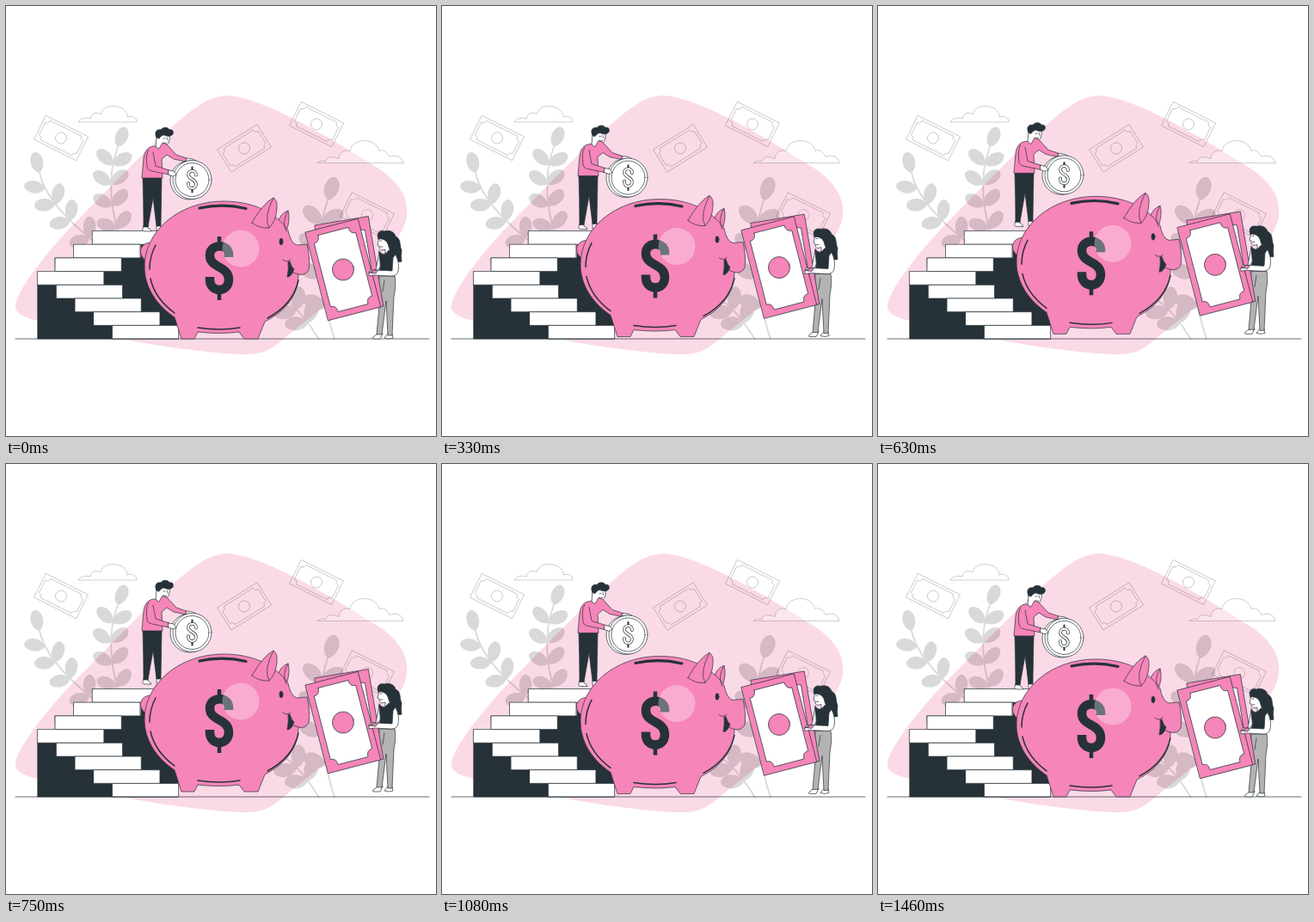
Recreate the animation shown at these times as an HTML page. Size 500 by 500 pixels, loop 1500 ms.

```html
<!DOCTYPE html>
<html lang="en">
<head>
<meta charset="utf-8">
<title>Savings</title>
<style>
html, body { margin: 0; width: 100%; height: 100%; overflow: hidden; background: #fff; }
svg { display: block; width: 100vw; height: 100vh; }
.line { fill: none; stroke: #263238; stroke-width: .7; stroke-linecap: round; stroke-linejoin: round; }
.pink { fill: #f685b9; }
.white { fill: #fff; }
.dark { fill: #263238; }
.grey { fill: #b3b3b3; }
.bold { stroke-width: 1.5; }
.faint { fill: none; stroke: #000; stroke-opacity: .24; stroke-width: .8; }
</style>
</head>
<body>
<svg viewBox="0 0 500 500">
  <defs>
    <path id="leaf" d="M0 0C-9-5-9-16-5-22Q-2-26 2-24C9-20 9-6 0 0"/>
    <g id="note" class="faint">
      <path d="M-27.500-15.500h55v31h-55z"/>
      <path d="M-20-12.500h40q0 4 4.500 4.500v16q-4.500 .5-4.500 4.500h-40q0-4-4.500-4.500v-16q4.500-.5 4.500-4.500z"/>
      <circle r="6.500"/>
    </g>
    <g id="bill" class="line">
      <path class="pink" d="M-31.500-53h63v106h-63z"/>
      <path class="white" d="M-18-46h36q0 8 7 8v76q-7 0-7 8h-36q0-8-7-8v-76q7 0 7-8z"/>
      <circle class="pink" r="12.500"/>
    </g>
    <path id="dollar" d="M11-13v-3C11-29-11-29-11-15C-11 0 11-3 11 13C11 29-11 29-11 13v-3"/>
  </defs>

  <path fill="#fbdae7" d="M258 104C300 107 375 152 430 187C455 202 469 222 466 245C460 282 400 326 334 378C306 401 302 406 270 405C220 402 165 394 110 382L37 366Q8 360 11 347C15 329 43 288 100 232C150 181 200 130 227 114Q242 104 258 104"/>
  <g id="plants" opacity=".15"></g>
  <g class="faint">
    <path class="white" d="M84 135h68c0-6-6-8-11-6c1-14-28-18-31-3c-5-4-11-1-12 5c-5-2-12 0-14 4z"/>
    <path class="white" fill-opacity=".3" d="M362 182.500h100c-1-8-10-10-16-7c-3-7-8-9-12-7c-4-17-32-15-34 0c-9-2-12 3-13 9c-6-2-13-4-15 3c-4-1-8 0-10 2z"/>
  </g>
  <use href="#note" transform="translate(64 153.500)rotate(26.500)"/>
  <use href="#note" transform="translate(277 165.500)rotate(-32)"/>
  <use href="#note" transform="translate(361 137.500)rotate(26.500)"/>
  <use href="#note" transform="translate(420 243)rotate(26.500)"/>

  <g id="steps" class="line">
    <path class="dark" d="M37 324h22l-2-31h100v-16h43v110H37z"/>
  </g>
  <path class="line" d="M11 387H492"/>

  <g id="float" class="line">
    <!-- man -->
    <path class="white" d="M160 255l-1 4q-1 3 3 3h7q-1-3-4-4v-3zM175 255v6q5 2 7 0l-2-6z"/>
    <path class="dark" d="M159 199h22l-1 57h-5l-4-33l-6 34h-5q0-31-1-58z"/>
    <path class="white" d="M175 151l-1 13q6 6 9 0l1-2c5 1 7-6 6-12l-6-3z"/>
    <path class="dark" d="M175 153c-3-6 0-10 5-9c3-4 9-3 10 0c4-1 5 2 4 5c-2 3-7 3-10 1c-3 0-4 2-6 4z"/>
    <path d="M183 154h2M187 153l1 3M183 159q2 1 4 0"/>
    <path class="pink" d="M173 163C165 163 161 169 160 177L158 200h24l-1-22l6-5l8 5l14 3l1-4l-12-4l-11-12l-5-2l-4 7z"/>
    <path class="white" d="M210 177l7 1l4 2q-4 2-12 1z"/>
    <!-- coin -->
    <circle class="white" cx="213.500" cy="202.500" r="22.500"/>
    <circle class="white" cx="216.500" cy="202" r="22.500"/>
    <circle cx="216.500" cy="202" r="19.500"/>
    <g transform="translate(216.500 202)scale(.4)">
      <path stroke-width="5" d="M0-36v11M0 25v11"/>
      <use href="#dollar" stroke-width="9"/>
      <use href="#dollar" stroke="#fff" stroke-width="5.500"/>
    </g>
    <path class="pink" d="M166 167Q162 172 164 186Q164 191 170 192L189 196l1-5l-16-5l-3-16"/>
    <path class="white" d="M189 191l6 1l3 4l-4 2l-5-2z"/>

    <!-- woman and bills -->
    <path class="white" d="M432 381l-5 4q-2 2 1 2h7l3-6zM444 381l-4 5q5 2 10 0l-1-5z"/>
    <path class="grey" d="M434 314h18q2 9-1 24l-2 45h-5l-2-40l-5 39h-6l4-45q-3-12-1-23z"/>
    <path d="M440 319l-2 13"/>
    <path class="white" d="M434 269l-2 9l2 1q0 5 3 5l4-1v6h8l-4-19z"/>
    <path d="M435 273h2M435 280h3"/>
    <path class="dark" d="M433 271C430 264 435 260 440 262C446 260 452 263 453 268C460 271 457 278 460 284Q459 291 460 297Q455 299 452 293C446 290 447 284 445 280C444 274 440 270 433 271z"/>
    <path class="dark" d="M434 285q5 8 11-1l8 5l1 17l-4 2h-16q3-8 0-13z"/>
    <use href="#bill" transform="translate(399 302)rotate(-9.500)"/>
    <use href="#bill" transform="translate(392 306.500)rotate(-14.500)"/>
    <path class="white" d="M453 289q5 10 3 19q-1 6-8 6l-20-1-6 1v-4l7-3l20 1l1-15zM434 287l-4 20l-6 0l-2 3l8 1l5-8z"/>

    <!-- pig -->
    <path class="pink" d="M167 275c-9 1-13 9-9 16q2 4 7 6"/>
    <path class="pink" d="M316 252Q319 241 328 238Q331 248 326 262z"/>
    <path class="pink" d="M161 303C161 261 202 227 253 227C286 227 313 239 328 261Q331 276 338 278L350 277Q354 295 352 307Q348 314 340 312C340 336 325 355 301 367L293 387H277L271 379Q249 382 223 379L219 387H204L196 362C174 347 161 326 161 303z"/>
    <path class="pink" d="M286 252Q299 229 311 223Q316 226 315 236Q314 250 306 258Q295 259 286 252z"/>
    <path d="M306 258Q299 246 311 223M326 262Q320 251 328 238M340 312L334 310"/>
    <path class="bold" d="M174 278Q167 291 167 306M168 317Q173 340 196 357M340 319Q334 347 304 363M223 374Q249 378 272 374"/>
    <path stroke-width="3.200" d="M225 235Q252 229 279 235.500"/>
    <ellipse class="dark" cx="320" cy="274" rx="2" ry="3.800"/>
    <path class="dark" d="M328 298Q329 305 327 315Q332 315 335 306Q332 304 330 297z"/>
    <path d="M322 295Q326 299 331 295"/>
    <g transform="translate(248 305)" stroke-linecap="butt">
      <use href="#dollar" stroke-width="10.500"/>
      <path stroke-width="4.500" d="M0-37v13M0 24v13"/>
    </g>
    <circle cx="273" cy="282" r="21.500" fill="#fff" fill-opacity=".32" stroke="none"/>
  </g>
</svg>
<script>
const $ = id => document.getElementById(id);

function add(parent, tag, attrs) {
  const el = document.createElementNS('http://www.w3.org/2000/svg', tag);
  for (const key in attrs) el.setAttribute(key, attrs[key]);
  $(parent).append(el);
}

// A curved stem from tip to base: one leaf on the tip, pairs along the way
function plant([x0, y0], [x1, y1], [x2, y2], nodes, size = 1, firstRight = 1) {
  add('plants', 'path', { d: `M${x0} ${y0}Q${x1} ${y1} ${x2} ${y2}`, fill: 'none', stroke: '#000', 'stroke-width': 1.8 });
  for (let i = 0; i < nodes; i++) {
    const t = i / nodes, u = 1 - t;
    const x = u * u * x0 + 2 * u * t * x1 + t * t * x2;
    const y = u * u * y0 + 2 * u * t * y1 + t * t * y2;
    const dx = u * (x1 - x0) + t * (x2 - x1);
    const dy = u * (y1 - y0) + t * (y2 - y1);
    const angle = Math.atan2(-dx, dy) * 180 / Math.PI;
    const leaf = turn => add('plants', 'use', {
      href: '#leaf', transform: `translate(${x} ${y})rotate(${angle + turn})scale(${size})`
    });
    if (i === 0) leaf(0);
    else {
      leaf(-55);
      if (i >= firstRight) leaf(52);
    }
  }
}
plant([39, 194], [49, 238], [125, 290], 5, 1, 2);
plant([130, 164], [111, 213], [138, 288], 5);
plant([374, 226], [352, 290], [382, 388], 5, 1.15);
plant([325, 342], [345, 356], [364, 388], 3, 1.1);

const stepHeight = 15.7;
for (let i = 0; i < 8; i++)
  add('steps', 'rect', {
    class: 'white', x: 36.2 + 21.7 * Math.abs(i - 2.97), y: 261.5 + i * stepHeight, width: 77, height: stepHeight
  });

function draw(now) {
  const lift = 3 * (1 - Math.cos(now / 1500 * 2 * Math.PI));
  $('float').setAttribute('transform', `translate(0 ${-lift})`);
  requestAnimationFrame(draw);
}
draw(performance.now());
</script>
</body>
</html>
```
